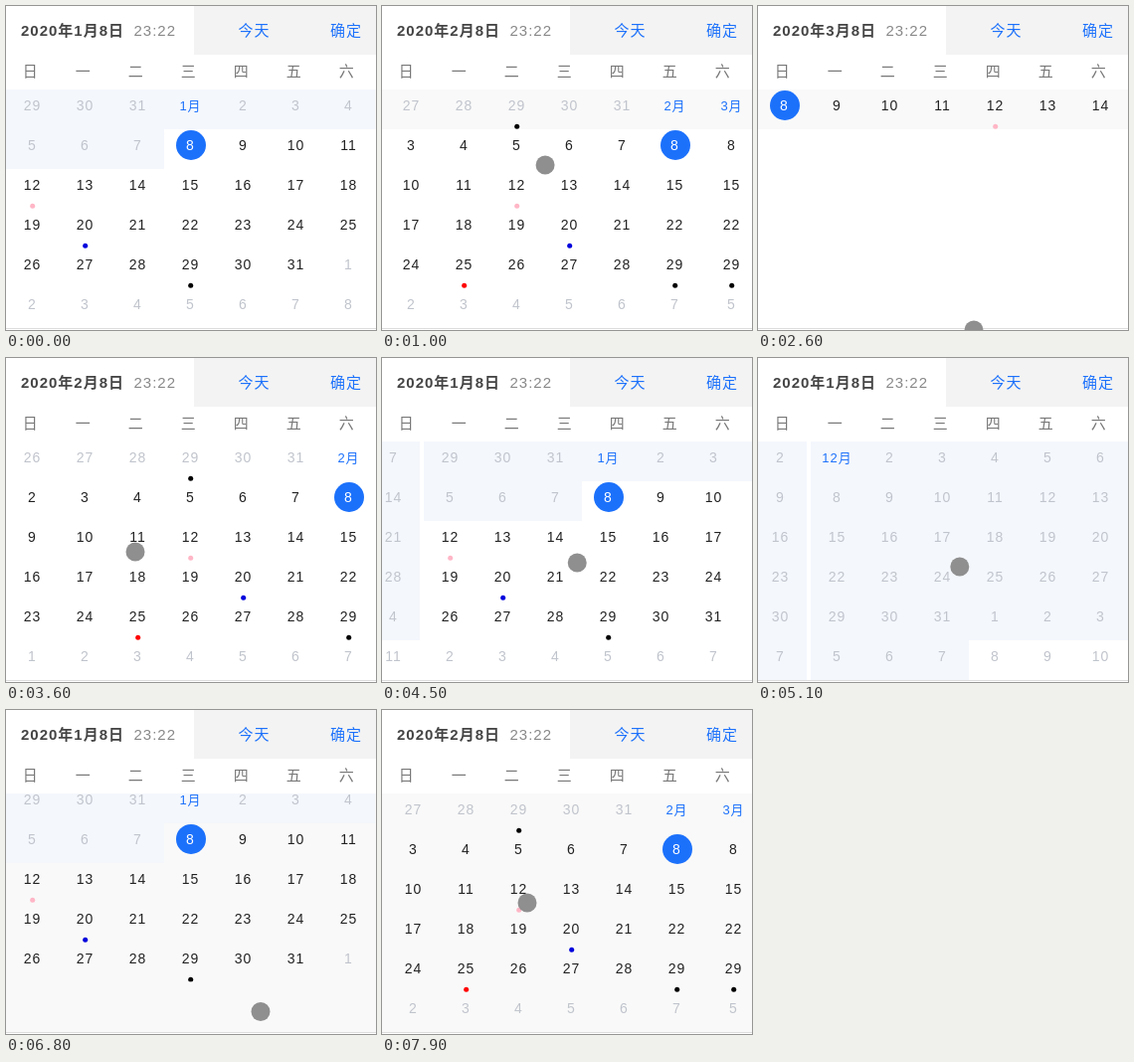
Write an HTML page with a canvas that moves like this. It is 372 px wide and 326 px high and loops after 8 s.

```html
<!DOCTYPE html>
<html lang="zh">
<head>
<meta charset="utf-8">
<title>Calendar</title>
<style>
html, body { margin: 0; width: 372px; height: 326px; overflow: hidden; background: #fff; }
canvas { display: block; }
</style>
</head>
<body>
<canvas id="stage" width="372" height="326"></canvas>
<script>
const ctx = document.getElementById('stage').getContext('2d');
const W = 372, H = 326, LOOP = 8000, STEP = 100;
const TOP = 84, ROW = 40, COL = 53, PAGE = 375;
const BLUE = '#1c71fb', MUTED = '#c0c4cc', PALE = '#f4f7fc', SOFT = '#f9f9f9';
const FAMILY = '"Liberation Sans", "Noto Sans CJK SC", "Noto Sans CJK", sans-serif';
const FIRST_OPEN = Date.UTC(2020, 0, 8);

// Every gesture drags at a steady speed, then settles with an ease-out
const DRAG = 300, SETTLE = 300;
const SWIPE = { speed: 0.48, span: PAGE };
const PULL = { speed: 0.5, span: 5 * ROW };
const gesture = (kind, start, dir, x, y) => ({ kind, start, dir, x, y });
const GESTURES = [
  gesture(SWIPE, 200, 1, 270, 165),
  gesture(SWIPE, 896, 1, 214, 160),
  gesture(PULL, 1900, -1, 180, 284),
  gesture(PULL, 2600, 1, 217, 326),
  gesture(SWIPE, 2900, -1, 120, 190),
  gesture(SWIPE, 3600, -1, 130, 195),
  gesture(SWIPE, 4412, -1, 154, 206),
  gesture(SWIPE, 4990, -1, 150, 210),
  gesture(PULL, 5600, -1, 256, 219),
  gesture(PULL, 6501, 1, 256, 154),
  gesture(SWIPE, 7050, 1, 270, 180),
  gesture(SWIPE, 7800, 1, 194, 194)
];

function progress({ speed, span }, age) {
  const moved = speed * Math.min(age, DRAG) / span;
  const k = Math.min(Math.max((age - DRAG) / SETTLE, 0), 1);
  return moved + (1 - moved) * (1 - (1 - k) ** 3);
}

// Month position (0 = January 2020), openness (1 = month, 0 = week), chosen month, touch point
function stateAt(t) {
  const s = { month: 0, open: 1, chosen: 0, touch: null };
  for (const { kind, start, dir, x, y } of GESTURES) {
    const age = t - start;
    if (age < 0) break;
    const amount = dir * progress(kind, age);
    const done = age >= DRAG + SETTLE;
    const reach = dir * kind.speed * age;
    if (kind === SWIPE) {
      s.month += done ? dir : amount;
      if (done) s.chosen = Math.max(0, s.month);
    } else {
      s.open += amount;
      if (done && dir < 0) s.month = s.chosen;
    }
    if (age < DRAG) s.touch = kind === SWIPE ? [x - reach, y] : [x, y + reach];
  }
  return s;
}

function rect(x, y, w, h, color) {
  ctx.fillStyle = color;
  ctx.fillRect(x, y, w, h);
}

function disc(x, y, r, color) {
  ctx.fillStyle = color;
  ctx.beginPath();
  ctx.arc(x, y, r, 0, Math.PI * 2);
  ctx.fill();
}

function text(str, x, y, color, { size = 15, weight = 'normal', align = 'left' } = {}) {
  ctx.font = `${weight} ${size}px ${FAMILY}`;
  ctx.letterSpacing = '1px';
  ctx.textAlign = align;
  ctx.fillStyle = color;
  ctx.fillText(str, x, y);
}

function markColor(month, day) {
  if (month === 1 && day === 25) return '#f00';
  return { 12: '#ffb6c6', 20: '#00d', 29: '#000' }[day];
}

function drawMonth(index, left, top, chosen) {
  const lead = new Date(Date.UTC(2020, index, 1)).getUTCDay();
  const month = (index + 12) % 12;
  for (let i = 0; i < 42; i++) {
    const date = new Date(Date.UTC(2020, index, 1 - lead + i));
    const day = date.getUTCDate(), own = date.getUTCMonth() === month;
    const x = left + (i % 7) * COL, y = top + Math.floor(i / 7) * ROW;
    const cx = x + COL / 2, shut = date.getTime() < FIRST_OPEN;
    const picked = own && day === 8 && index === chosen;
    const opening = own && day === 1;
    if (shut) rect(x, y, COL, ROW, PALE);
    if (picked) disc(cx + 0.5, y + 16, 15, BLUE);
    const color = picked ? '#fff' : opening ? BLUE : shut || !own ? MUTED : '#222';
    text(opening ? `${month + 1}月` : `${day}`, cx, y + 21, color,
      { size: opening ? 13 : 14, align: 'center' });
    const mark = !shut && markColor(date.getUTCMonth(), day);
    if (mark) disc(cx + 0.2, y + 37.3, 2.5, mark);
  }
}

function drawHeader(chosen) {
  rect(0, 0, W, TOP, '#fff');
  rect(189, 0, W - 189, 49, '#f3f3f3');
  text(`2020年${chosen + 1}月8日`, 15, 30, '#444', { weight: 'bold' });
  text('23:22', 128.5, 30, '#888');
  text('今天', 233.5, 30, BLUE);
  text('确定', 326, 30, BLUE);
  [...'日一二三四五六'].forEach((d, i) =>
    text(d, 24.8 + i * COL, 71, '#777', { align: 'center' }));
}

function draw(t) {
  const { month, open, chosen, touch } = stateAt(t);
  rect(0, 0, W, H, t >= 6200 ? SOFT : '#fff');
  if (t < 2800) rect(0, TOP, W, ROW, SOFT);

  ctx.save();
  ctx.beginPath();
  ctx.rect(0, TOP, W, ROW + 5 * ROW * open);
  ctx.clip();
  const first = Math.floor(month);
  for (let m = first; m <= first + 1; m++) {
    drawMonth(m, Math.round((m - month) * PAGE), TOP - ROW * (1 - open), chosen);
  }
  ctx.restore();

  drawHeader(chosen);
  rect(0, 324, W, 1, '#ddd');
  rect(0, 325, W, 1, '#fff');
  if (touch) disc(...touch, 9.5, '#8f8f8f');
}

const start = performance.now();
function tick() {
  const t = (performance.now() - start) % LOOP;
  draw(Math.floor(t / STEP) * STEP);
  requestAnimationFrame(tick);
}
tick();
</script>
</body>
</html>
```
